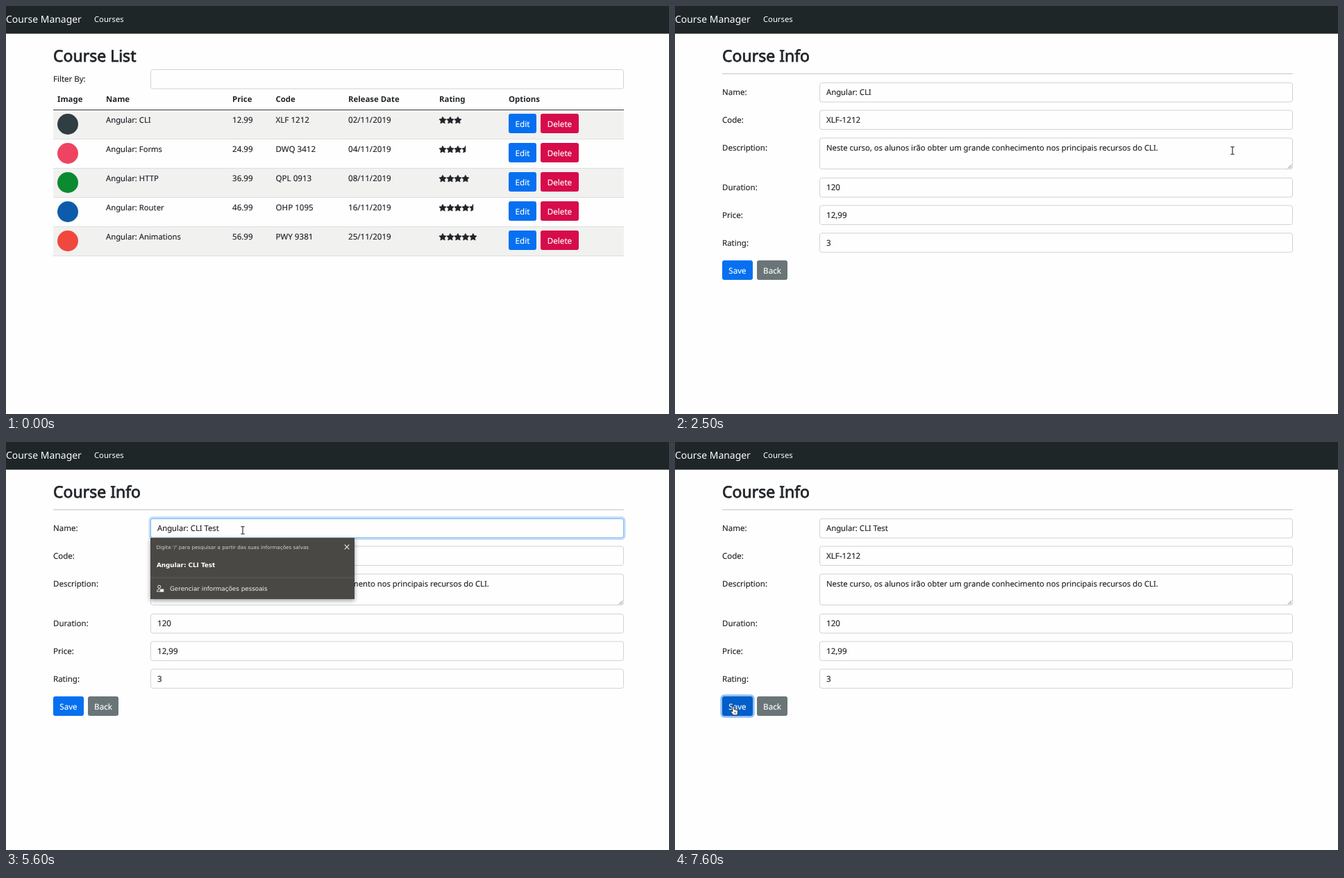
These frames come from a looping animation (955x587 px, 8000 ms). An HTML page:

```html
<!DOCTYPE html>
<html lang="en">
<head>
<meta charset="utf-8">
<title>Course Manager</title>
<style>
  html, body { margin: 0; width: 100%; height: 100%; overflow: hidden; background: #fefefe; }
  svg { display: block; }
  text { font: 11.25px "Noto Sans", "Open Sans", sans-serif; fill: #212529; stroke: #212529; stroke-width: .15px; white-space: pre; text-rendering: geometricPrecision; }
  .num { font-size: 11.6px; }
  .label { font-size: 11.5px; }
  .brand { font-size: 13.95px; fill: #fff; stroke: none; }
  .nav { fill: #fff; stroke: none; }
  .title { font-size: 23px; stroke-width: .8px; }
  .head { font-weight: 700; font-size: 11.4px; stroke: none; }
  .btn { font-size: 11.6px; fill: #fff; stroke: #fff; text-anchor: middle; }
  .popup text { font: 8.8px "DejaVu Sans", sans-serif; fill: #f2f2f0; stroke: none; }
  .popup .hint { font-size: 7.2px; fill: #d0d0cd; }
  .popup .pick { font-weight: 700; fill: #fff; }
</style>
</head>
<body>
<svg id="stage" width="955" height="587" viewBox="0 0 955 587"></svg>
<script>
const LOOP = 8000, STEP = 100;
const BLUE = '#0670f1', RED = '#d60c4b', GRAY = '#6a7578', INK = '#212529';

const text = (x, y, s, cls = '', id = '') => `<text x="${x}" y="${y}" class="${cls}" id="${id}">${s}</text>`;
const rect = (x, y, w, h, fill, more = '') => `<rect x="${x}" y="${y}" width="${w}" height="${h}" fill="${fill}" ${more}/>`;
const path = (d, more) => `<path d="${d}" ${more}/>`;
const group = (id, body, more = '') => `<g id="${id}" ${more}>${body}</g>`;
const field = (y, h = 27.5) => rect(208.5, y + .5, 681, h, '#fefefe', 'rx="3" stroke="#cfd2d4"');
const button = (x, y, w, label, fill, id = '') =>
  rect(x, y, w, 28, fill, `rx="3" id="${id}"`) + text(x + w / 2, y + 18.5, label, 'btn');

function star(cx, cy, half) {
  const points = [];
  for (let i = 0; i <= (half ? 5 : 9); i++) {
    const a = -Math.PI / 2 - i * Math.PI / 5, r = i % 2 ? 2.8 : 5.4;
    points.push((cx + r * Math.cos(a)).toFixed(2) + ' ' + (cy + r * Math.sin(a)).toFixed(2));
  }
  return path(`M${points.join('L')}Z`, `fill="${INK}" stroke="${INK}" stroke-width=".7" stroke-linejoin="round"`);
}

const courses = [
  ['Angular: CLI', '12.99', 'XLF 1212', '02/11/2019', 3, '#303d42'],
  ['Angular: Forms', '24.99', 'DWQ 3412', '04/11/2019', 3.5, '#ee4461'],
  ['Angular: HTTP', '36.99', 'QPL 0913', '08/11/2019', 4, '#0c8a30'],
  ['Angular: Router', '46.99', 'OHP 1095', '16/11/2019', 4.5, '#0d5cab'],
  ['Angular: Animations', '56.99', 'PWY 9381', '25/11/2019', 5, '#f1483d'],
];
const columns = [144, 326, 388.5, 493, 624, 724];

function courseRow(course, i) {
  const y = 150 + 42 * i, rating = course[4];
  let s = i % 2 ? '' : rect(68, y, 822, 41, '#f1f1f0');
  s += rect(68, y + 41, 822, 1, '#dddfe0');
  s += `<circle cx="89" cy="${y + 20}" r="15" fill="${course[5]}"/>`;
  for (let c = 0; c < 4; c++) s += text(columns[c], y + 18.3, course[c], c ? 'num' : '');
  for (let n = 0; n < rating; n++) s += star(629 + 10.95 * n, y + 14.6, rating - n < 1);
  return s + button(724, y + 5, 40, 'Edit', BLUE, 'edit' + i) + button(770, y + 5, 55, 'Delete', RED);
}

const navbar = rect(0, 0, 955, 39.8, '#1f2628') +
  text(0, 24.2, 'Course Manager', 'brand') + text(127, 23.4, 'Courses', 'nav');

const list = text(68, 80.2, 'Course List', 'title') +
  text(68, 109.3, 'Filter By:', 'label') + field(91) + text(74, 138.2, 'Image', 'head') +
  ['Name', 'Price', 'Code', 'Release Date', 'Rating', 'Options'].map((s, i) => text(columns[i], 138.2, s, 'head')).join('') +
  courses.map(courseRow).join('') + rect(68, 149, 822, 1, '#3c4043');

const fields = [
  ['Name:', 110, ''], ['Code:', 149.5, 'XLF-1212'],
  ['Description:', 189.5, 'Neste curso, os alunos irão obter um grande conhecimento nos principais recursos do CLI.'],
  ['Duration:', 247, '120'], ['Price:', 286.5, '12,99'], ['Rating:', 326.3, '3'],
];
const info = text(68, 80.2, 'Course Info', 'title') + rect(68, 97, 822, 1, '#c3c5c5') +
  fields.map(([label, y, value], i) =>
    text(68, y + 18.2, label, 'label') + field(y, i == 2 ? 44.5 : 27.5) +
    text(218, y + 18.2, value, /\d/.test(value) ? 'num' : '', 'value' + i)).join('') +
  path('M883 233.5l5-5M886 233.5l2-2', 'stroke="#666" stroke-width=".9"') +
  group('focus', rect(207, 108.7, 684, 30.6, 'none', 'rx="4" stroke="#bfdcfa" stroke-width="2.8"') +
    rect(208.5, 110.5, 681, 27.3, 'none', 'rx="3" stroke="#82bbf3"')) +
  rect(0, 117.5, 1, 12.5, '#111', 'id="caret"') +
  rect(66.7, 364.7, 46.6, 30.6, 'none', 'id="saveRing" rx="4.5" stroke="#8fc0f8" stroke-width="2.8"') +
  button(68, 366, 44, 'Save', BLUE, 'save') + button(118, 366, 44, 'Back', GRAY);

const popup = rect(208, 138, 294, 88, '#494845', 'style="filter:drop-shadow(0 2px 3px #0006)"') +
  text(216.5, 153.8, "Digite '/' para pesquisar a partir das suas informações salvas", 'hint') +
  path('M487.7 147.7l6.6 6.6m0-6.6l-6.6 6.6', 'stroke="#eee" stroke-width="1.1"') +
  text(217, 180.2, 'Angular: CLI Test', 'pick') + rect(208, 194.5, 294, 1, '#5e5d5a') +
  `<circle cx="220.7" cy="208.3" r="2.1" fill="none" stroke="#eee"/>` +
  path('M222 215h-4.5v-1.3q.8-2.2 4-2', 'fill="none" stroke="#eee"') + rect(222, 211.5, 5.3, 4.2, '#eee', 'rx=".6"') +
  text(236, 213.6, 'Gerenciar informações pessoais');

const cursors =
  group('arrow', path('M0 0V12.5L3 9.8 5 14.3 7.2 13.3 5.2 9H9Z', 'fill="#222" stroke="#fff" stroke-width=".8"')) +
  group('beam', path('M-2.7-5.2H2.7M0-5.2V5.2M-2.7 5.2H2.7', 'stroke="#fff" stroke-width="2.6"') +
    path('M-2.7-5.2H2.7M0-5.2V5.2M-2.7 5.2H2.7', 'stroke="#222" stroke-width="1.1"')) +
  group('hand', path('M-1.2 8V.6Q0-.8 1.2.6V4.8L5.6 5.8Q7 6.3 6.7 8L5.8 13H-.2L-3.7 8.2Q-3.6 6.4-1.2 8Z',
    'fill="#fff" stroke="#222" stroke-width="1" stroke-linejoin="round"') +
    path('M1.6 8.2v2.6M3.5 8.2v2.6', 'stroke="#222" stroke-width=".7"'));

document.getElementById('stage').innerHTML = rect(0, 0, 955, 587, '#fefefe') + navbar + group('list', list) +
  group('info', info) + group('popup', popup, 'class="popup"') + group('cursor', cursors);

// Pointer path: time, x, y, shape
const pointer = [
  [500, 8, 36, 'arrow'], [700, 190, 110, 'arrow'], [900, 530, 212, 'arrow'], [1100, 735, 234, 'arrow'],
  [1200, 741, 194, 'arrow'], [1300, 741, 183, 'hand'], [1400, 740, 179, 'hand'], [1600, 739, 169, 'hand'],
  [1700, 739, 169, 'hand'], [1800, 738, 166, 'hand'], [2200, 738, 166, 'hand'], [2300, 738, 166, 'beam'],
  [2400, 738, 166, 'beam'], [2600, 868, 250, 'arrow'], [2700, 690, 215, 'beam'], [2800, 430, 150, 'beam'],
  [2900, 341, 127, 'beam'], [6300, 341, 127, 'beam'], [6400, 358, 96, 'arrow'], [6500, 300, 270, 'arrow'],
  [6600, 222, 412, 'arrow'], [6700, 222, 412, 'arrow'], [6800, 155, 415, 'arrow'], [6900, 155, 415, 'arrow'],
  [7000, 130, 407, 'arrow'], [7100, 104, 396, 'arrow'], [7200, 90, 386, 'hand'], [7300, 84, 380, 'hand'],
];
// Typing: time, value, caret x (0 = blinked off)
const typing = [
  [0, 'Angular: CLI', 0], [2900, 'Angular: CLI', 282], [3600, 'Angular: CLI', 0], [4100, 'Angular: CLI ', 284],
  [4500, 'Angular: CLI T', 291], [4700, 'Angular: CLI Te', 297], [4900, 'Angular: CLI Tes', 302],
  [5100, 'Angular: CLI Test', 307], [5600, 'Angular: CLI Test', 0], [6200, 'Angular: CLI Test', 307],
  [6800, 'Angular: CLI Test', 0],
];

const el = id => document.getElementById(id);
const show = (id, v) => el(id).setAttribute('opacity', +v);
const ramp = (t, a, b) => Math.min(1, Math.max(0, (t - a) / (b - a)));
const shade = k => `rgb(${6 - 4 * k},${112 - 18 * k},${241 - 41 * k})`;
const latest = (keys, t) => keys.findLastIndex(k => k[0] <= t);

function drawPointer(t) {
  const i = latest(pointer, t);
  show('cursor', i >= 0);
  if (i < 0) return;
  const a = pointer[i], b = pointer[i + 1] || a, k = a === b ? 0 : (t - a[0]) / (b[0] - a[0]);
  el('cursor').setAttribute('transform', `translate(${a[1] + (b[1] - a[1]) * k} ${a[2] + (b[2] - a[2]) * k})`);
  for (const shape of ['arrow', 'beam', 'hand']) show(shape, shape === a[3]);
}

function draw(t) {
  const editing = t >= 2200;
  show('list', !editing);
  show('info', editing);
  el('edit0').setAttribute('fill', shade(ramp(t, 1300, 1500)));
  el('save').setAttribute('fill', shade(ramp(t, 7100, 7300)));

  const [, value, caretX] = typing[latest(typing, t)];
  el('value0').textContent = value;
  el('caret').setAttribute('x', caretX);
  show('caret', caretX > 0);
  show('focus', t < 3200 ? 0 : 1 - ramp(t, 7300, 7500) * (t < 7500 ? .6 : 1));
  show('saveRing', ramp(t, 7400, 7600));

  const open = t < 5000 ? ramp(t, 2800, 3000) : t < 7400 ? 1 : t < 7500 ? .64 : 0;
  const scale = 1 - .044 * (1 - open);
  show('popup', open);
  el('popup').setAttribute('transform', `translate(355 182) scale(${scale}) translate(-355 -182)`);
  drawPointer(t);
}

function tick() {
  draw(Math.floor(performance.now() % LOOP / STEP) * STEP);
  requestAnimationFrame(tick);
}
tick();
</script>
</body>
</html>
```
